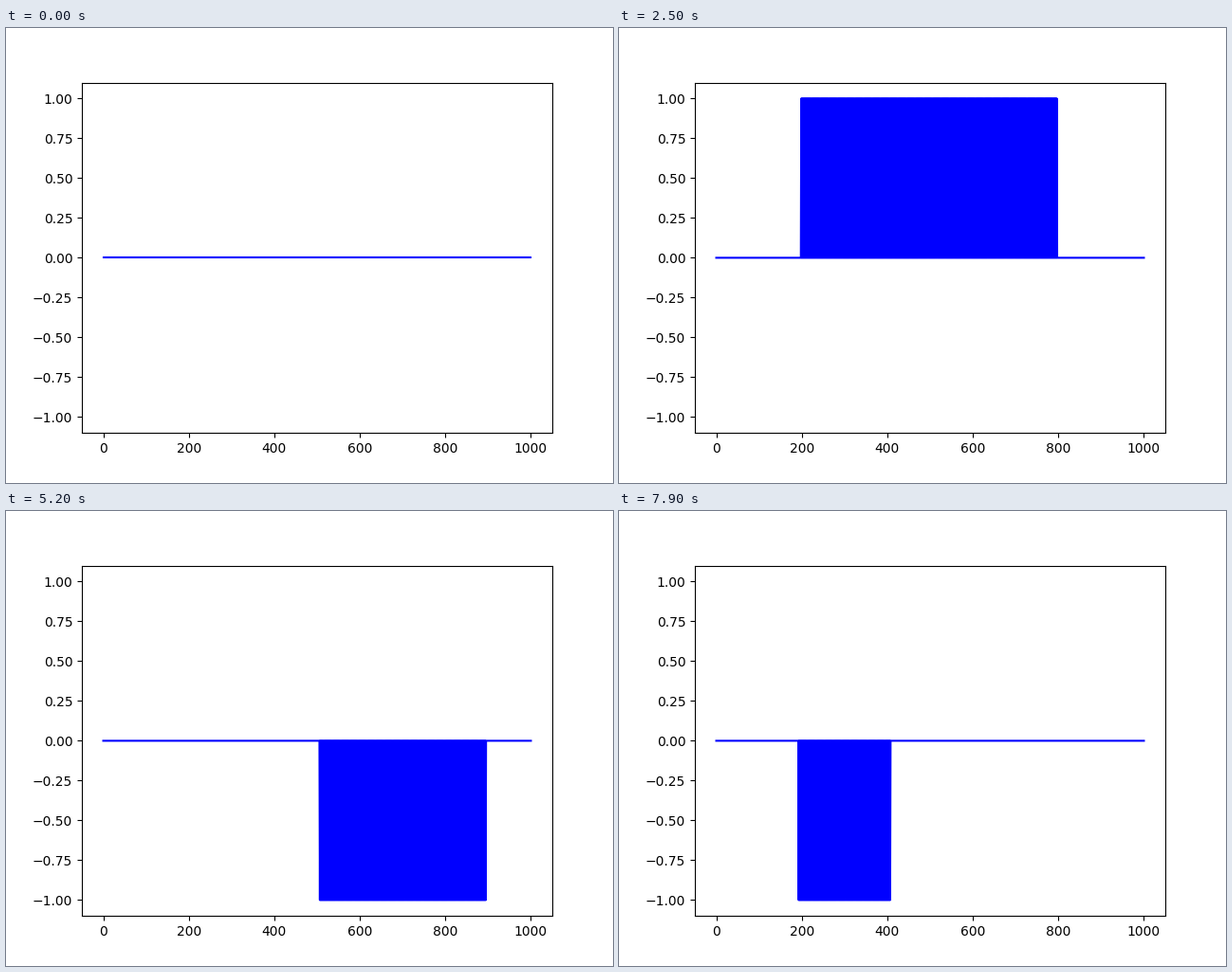
These frames come from a looping animation (640x480 px, 8 s). A matplotlib script:

```python
import numpy as np
import matplotlib.pyplot as plt
from matplotlib.animation import FuncAnimation

LAST = 1001            # index of the fixed right end
PLUCK = 300            # point that receives the impulse
STEPS_PER_FRAME = 100
FRAMES = 80


def string_states():
    """Discrete wave equation at unit speed with both ends held at zero."""
    prev = np.zeros(LAST + 1)
    cur = np.zeros(LAST + 1)
    prev[PLUCK] = -1
    states = []
    for step in range(FRAMES * STEPS_PER_FRAME):
        if step % STEPS_PER_FRAME == 0:
            states.append(cur.copy())
        new = np.zeros(LAST + 1)
        new[1:-1] = cur[2:] + cur[:-2] - prev[1:-1]
        prev, cur = cur, new
    return states


states = string_states()
x = np.arange(LAST + 1)

fig, ax = plt.subplots(figsize=(6.4, 4.8), dpi=100)
line, = ax.plot(x, states[0], color="blue", lw=1.5)
ax.set_ylim(-1.1, 1.1)


def update(frame):
    line.set_ydata(states[frame])
    return line,


anim = FuncAnimation(fig, update, frames=FRAMES, interval=100,
                     repeat=True, repeat_delay=0)
plt.show()
```
